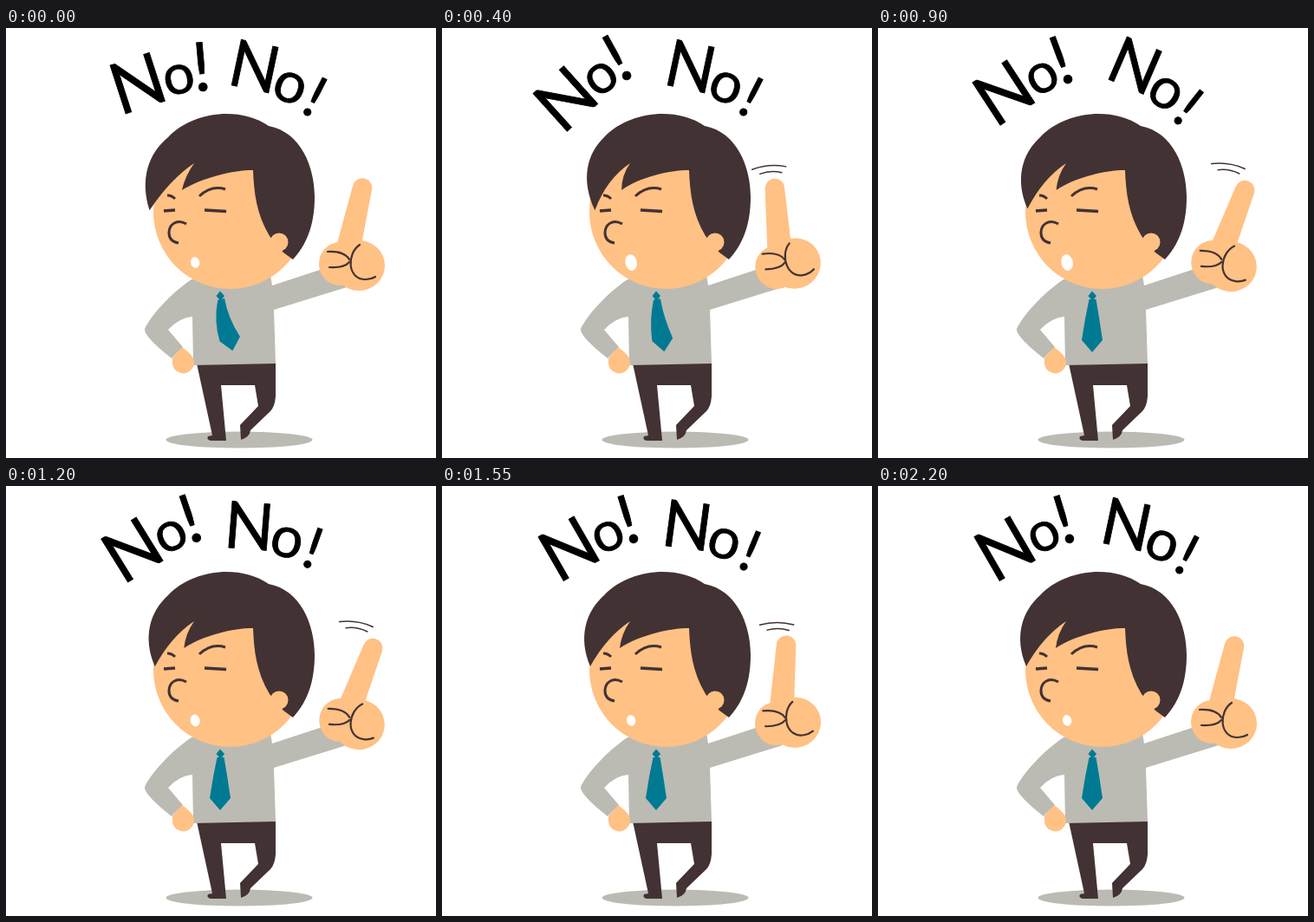
An HTML page that plays this animation: 496x496 px, repeating every 2.45 s.

```html
<!DOCTYPE html>
<html>
<head>
<meta charset="utf-8">
<style>
html, body { margin: 0; width: 100%; height: 100%; overflow: hidden; background: #fff }
svg { display: block; width: 100vw; height: 100vh }
text { font-family: Lato, sans-serif; text-anchor: middle; stroke: #000; stroke-width: .8 }
.skin { fill: #ffc184 }
.dark { fill: #433233 }
.shirt { fill: #bbbbb3 }
.tie { fill: #007a93 }
.line { fill: none; stroke: #433233; stroke-width: 3 }
.thin { stroke-width: 2.2; stroke-linecap: round }
</style>
</head>
<body>
<svg viewBox="0 0 496 496">
  <ellipse class="shirt" cx="269" cy="475" rx="84.5" ry="9.5"/>
  <path class="dark" d="M220 387H311V425Q310 437 305 442L282 464Q281 472 271 475L270 458 291 436 287 412H248L254 476H236Q231 475 233 471L238 470Z"/>
  <path class="shirt" d="M214 290L305 285 307 297 365 278 393 299 309 325 311 387 216 389 215 333Q200 334 187 348L204 368 191 381Q159 356 160 347C167 332 190 306 214 290Z"/>
  <path class="skin" d="M203 368C212 375 218 380 217 387C216 395 208 400 202 398C194 396 191 390 192 381Z"/>
  <path class="tie" d="M247 303.500L252 309 247.500 315 242.500 309Z"/>
  <path class="tie" id="tie"/>

  <ellipse class="skin" cx="258.500" cy="212" rx="88.500" ry="89"/>
  <path class="dark" id="hair"/>
  <circle class="skin" cx="315" cy="247" r="10.500"/>
  <g class="line">
    <path d="M182 211L195 210M229 210L254 211.500" stroke-width="3.500"/>
    <path d="M186 193Q191 193 195 197M223 194Q237 181 253 186"/>
    <path d="M208 226C196 219 188 228 188 236C188 243 192 247 199 248"/>
  </g>
  <ellipse fill="#fff" id="mouth" cx="218" cy="270.500" transform="rotate(-12 218 270)"/>

  <g id="hand">
    <g class="skin">
      <ellipse cx="385" cy="272" rx="24" ry="25"/>
      <ellipse cx="407" cy="274" rx="30" ry="29"/>
      <path d="M411 184.500L391 258H397Z" stroke="#ffc184" stroke-width="22.500" stroke-linejoin="round"/>
    </g>
    <path class="line thin" d="M408 250C393 260 393 290 415 290Q421 290 426 287"/>
  </g>
  <path class="line thin" id="thumb" d="M371 258Q390 257 396 267M373 276Q390 277 396 270"/>
  <path class="line thin" id="whoosh" style="stroke-width:1.500" d="M376 158Q396 154 415 161M384 164.500Q397 162 409 167"/>

  <g id="no1"></g>
  <g id="no2"></g>
</svg>
<script>
const $ = id => document.getElementById(id);
const STEP = 50, LAST = 2200, LOOP = 2450;

// Each glyph: character, centre x, centre y, tilt, font size
function word(id, glyphs) {
  $(id).innerHTML = glyphs.map(([ch, x, y, tilt, size]) =>
    `<text transform="translate(${x} ${y}) rotate(${tilt})" y="${size * (ch == 'o' ? .253 : .36)}" font-size="${size}">${ch}</text>`
  ).join('');
}
word('no1', [['N', 146, 72, -30, 82], ['o', 192, 58, -24, 64], ['!', 214, 38, -17, 78]]);
word('no2', [['N', 287, 44, 12, 75], ['o', 327, 69, 20, 66], ['!', 357, 79, 27, 66]]);

const wave = (t, period) => Math.cos(2 * Math.PI * t / period);
const clamp = x => Math.max(0, Math.min(1, x));
const turn = (id, angle, x, y) => $(id).setAttribute('transform', `rotate(${angle} ${x} ${y})`);

function draw(t) {
  const moving = t > 0 && t < LAST;

  const wag = moving ? 17 * wave(t - 250, 300) - .5 : 0;
  turn('hand', wag, 399, 273);
  turn('thumb', wag * .3, 399, 273);
  turn('whoosh', wag * .53, 399, 273);
  $('whoosh').style.display = moving ? '' : 'none';

  const first = 12 * clamp((1700 - t) / 1300) ** 2 * wave(t, 800 / 3);
  const second = t < 850 ? 0 : 16 * clamp((1800 - t) / 900) * wave(t - 950, 400);
  turn('no1', first, 189, 95);
  turn('no2', second, 297, 93);

  const h = -first * .45;
  const tip = `${171 + h} ${208 + Math.abs(h) * .4}`;
  $('hair').setAttribute('d', `M${tip}C${157 + h * .5} 175 ${165.5 + h * .3} 145 187 126
    C215 96 270 90 303 113C340 120 356 160 356 195C356 230 345 252 331 267L320 259 304 240
    C289 215 286 190 285 164C262 164 228 172 ${205 + h * .4} 187Q207 170 217 156Q190 174 ${tip}Z`);

  const sway = -13 * clamp(1 - t / 900) ** .75 * wave(t, 400);
  const bend = sway * .4;
  $('tie').setAttribute('d', `M243.500 313H251.500Q${255.5 + bend} 336 259 360L247 374 235 360Q${238.5 + bend} 336 243.500 313Z`);
  turn('tie', sway, 247, 310);

  const open = Math.min(clamp(t / 200), clamp((1250 - t) / 250));
  $('mouth').setAttribute('rx', 5.2 + 1.5 * open);
  $('mouth').setAttribute('ry', 6.3 + 3.2 * open);
}

const start = performance.now();
function frame() {
  const t = (performance.now() - start) % LOOP;
  draw(Math.min(LAST, Math.floor(t / STEP) * STEP));
  requestAnimationFrame(frame);
}
frame();
</script>
</body>
</html>
```
